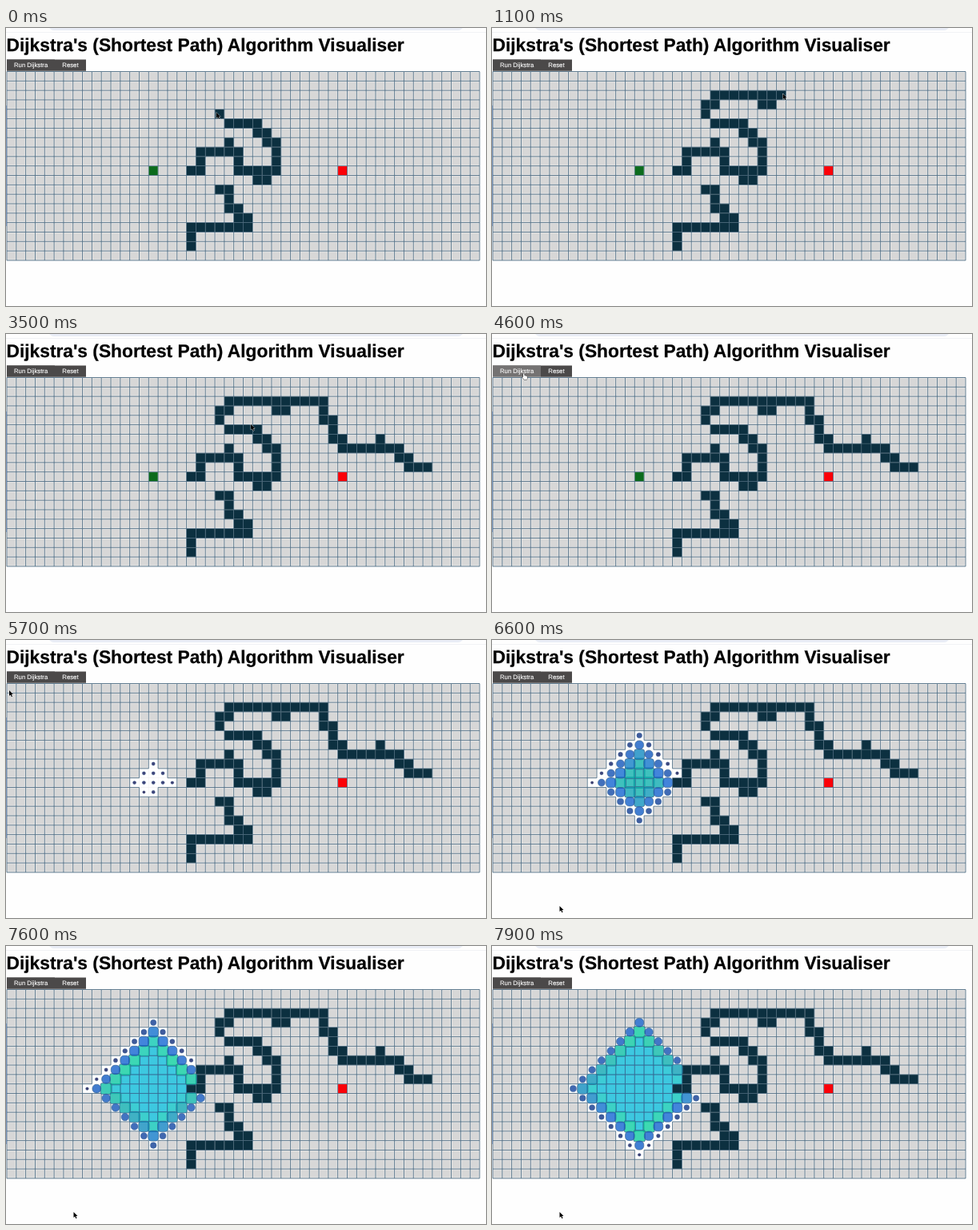
These frames come from a looping animation (600x348 px, 8 s). An HTML page with a canvas:

```html
<!DOCTYPE html>
<html lang="en">
<head>
<meta charset="utf-8">
<title>Shortest path visualiser</title>
<style>
  html, body { margin: 0; width: 600px; height: 348px; overflow: hidden; background: #fefefe; }
  svg, canvas { position: absolute; left: 0; top: 0; }
  text { font: 7.75px "Liberation Sans", Arial, sans-serif; fill: #fff; stroke: #fff; stroke-width: 0.12; text-rendering: geometricPrecision; }
  .title { font-size: 22.75px; font-weight: bold; fill: #000; stroke: #000; stroke-width: 0.25; }
</style>
</head>
<body>
<svg width="600" height="348">
  <rect x="53" y="-12" width="519" height="15" rx="7" fill="#e9edf6"/>
  <path d="M0 5.5H600" stroke="#f1f2f5"/>
  <path d="M0.5 97V248" stroke="#6088d2"/>
  <text class="title" x="0.5" y="29.2">Dijkstra's (Shortest Path) Algorithm Visualiser</text>
  <rect x="1" y="39.5" width="99" height="14.5" fill="#4b4949"/>
  <rect id="run" x="1" y="39.5" width="60" height="14.5" fill="#4b4949"/>
  <text x="10" y="49">Run Dijkstra</text>
  <text x="70.3" y="49">Reset</text>
</svg>
<canvas id="stage" width="600" height="348"></canvas>
<script>
const ctx = document.getElementById('stage').getContext('2d');
const runButton = document.getElementById('run');
const LOOP = 8000, TICK = 100;
const COLS = 50, ROWS = 20, CELL = 11.82, LEFT = 1, TOP = 54.5;
const START = [15, 10], END = [35, 10];
const WALL = '#0c3040';
const MS_PER_WALL = 88;
const SEARCH_BEGIN = 5470, FIRST_PAINT = 5650, MS_PER_VISIT = 23, VISIT_LENGTH = 1500;

const key = (col, row) => row * COLS + col;
const corner = (col, row) => [LEFT + col * CELL, TOP + row * CELL];
const mix = (a, b, f) => a + (b - a) * f;
const clamp01 = x => Math.min(1, Math.max(0, x));
const easeOut = x => 1 - (1 - x) ** 1.667;

// Walks from a cell along steps such as 'r3 d' and returns every cell passed.
const STEPS = { u: [0, -1], d: [0, 1], l: [-1, 0], r: [1, 0] };
function walk(col, row, steps = '') {
  const cells = [[col, row]];
  for (const [, direction, count] of steps.matchAll(/([udlr])(\d*)/g)) {
    const [dx, dy] = STEPS[direction];
    for (let n = Number(count || 1); n > 0; n--) cells.push([col += dx, row += dy]);
  }
  return cells;
}

const oldWalls = [
  ...walk(23, 5, 'r3 d r d r d3 l4 u2 l4 d2 l'),
  ...walk(23, 7),
  ...walk(26, 11, 'r'),
  ...walk(22, 12, 'r d2 r d r d l6 d2')
];
const newWalls = walk(22, 4, 'u r u r5 d r u r4 d2 r d2 r d r4 u d r2 d r d r2');

// Cells in the order of the search: by distance, then row by row.
function searchOrder() {
  const walls = new Set([...oldWalls, ...newWalls].map(cell => key(...cell)));
  const distance = new Map([[key(...START), 0]]);
  const queue = [START];
  for (const [col, row] of queue) {
    const next = distance.get(key(col, row)) + 1;
    for (const [dx, dy] of Object.values(STEPS)) {
      const c = col + dx, r = row + dy, k = key(c, r);
      if (c < 0 || r < 0 || c >= COLS || r >= ROWS || walls.has(k) || distance.has(k)) continue;
      distance.set(k, next);
      queue.push([c, r]);
    }
  }
  return queue.sort((a, b) =>
    distance.get(key(...a)) - distance.get(key(...b)) || key(...a) - key(...b));
}

const visits = searchOrder().map((cell, i) =>
  ({ cell, time: Math.max(FIRST_PAINT, SEARCH_BEGIN + i * MS_PER_VISIT) }));

const tints = [
  { at: 0, rgb: [0, 0, 66] },
  { at: 0.5, rgb: [8, 94, 208] },
  { at: 0.75, rgb: [0, 205, 152] },
  { at: 1, rgb: [0, 183, 215] }
];
function tint(p) {
  const i = Math.max(1, tints.findIndex(stop => stop.at >= p));
  const a = tints[i - 1], b = tints[i];
  const f = easeOut((p - a.at) / (b.at - a.at));
  return `rgba(${a.rgb.map((v, k) => Math.round(mix(v, b.rgb[k], f)))},0.76)`;
}

function fillCell(cell, color, inset = 0) {
  const [x, y] = corner(...cell);
  ctx.fillStyle = color;
  ctx.fillRect(x + inset, y + inset, CELL - 2 * inset, CELL - 2 * inset);
}

function strokePath(path, color, width) {
  ctx.strokeStyle = color;
  ctx.lineWidth = width;
  ctx.stroke(path);
}

// Visited cells lose their outline; their neighbours keep it.
function drawGrid(visitedKeys) {
  const lines = new Path2D();
  const open = (col, row) =>
    col >= 0 && row >= 0 && col < COLS && row < ROWS && !visitedKeys.has(key(col, row));
  for (let row = 0; row <= ROWS; row++) {
    for (let col = 0; col <= COLS; col++) {
      const [x, y] = corner(col, row);
      if (open(col, row) || open(col - 1, row)) { lines.moveTo(x, y); lines.lineTo(x, y + CELL); }
      if (open(col, row) || open(col, row - 1)) { lines.moveTo(x, y); lines.lineTo(x + CELL, y); }
    }
  }
  strokePath(lines, 'rgba(255,255,255,0.35)', 2.6);
  strokePath(lines, '#47677f', 0.85);
}

function drawVisit({ cell, time }, t) {
  const p = clamp01((t - time) / VISIT_LENGTH);
  const scale = p < 0.75 ? mix(0.3, 1.2, easeOut(p / 0.75)) : mix(1.2, 1, easeOut((p - 0.75) * 4));
  const size = CELL * scale, shift = (CELL - size) / 2;
  const [x, y] = corner(...cell);
  const shape = new Path2D();
  shape.roundRect(x + shift, y + shift, size, size, size * Math.min(0.5, 1 - easeOut(p)));
  ctx.fillStyle = tint(p);
  ctx.fill(shape);
  strokePath(shape, '#3a6590', 0.7 * scale);
}

const arrow = new Path2D('M0 0V7L1.7 5.5L2.9 8.2L4 7.7L2.9 5.1H5Z');
const hand = new Path2D('M0 0.8Q0.8 -0.4 1.5 0.8V3L4.8 3.8Q5.4 4 5.2 5L4.6 8H1L-1.3 4.8Q-1 4 0 5Z');

function drawPointer(x, y, overButton) {
  const shape = overButton ? hand : arrow;
  ctx.save();
  ctx.translate(x, y);
  strokePath(shape, overButton ? '#111' : '#fff', 0.8);
  ctx.fillStyle = overButton ? '#fff' : '#000';
  ctx.fill(shape);
  ctx.restore();
}

// The pointer draws the wall, then glides to the button, the corner and the bottom.
const glides = [
  { from: 3200, to: 4200, x: 39, y: 49 },
  { from: 5400, to: 5700, x: 4, y: 63 },
  { from: 5900, to: 6150, x: 84.5, y: 333 }
];
function pointerAt(t, progress) {
  const i = Math.floor(progress);
  const a = corner(...newWalls[i]), b = corner(...newWalls[Math.min(i + 1, newWalls.length - 1)]);
  let x = mix(a[0], b[0], progress - i) + 2, y = mix(a[1], b[1], progress - i) + 4;
  for (const glide of glides) {
    const f = easeOut(clamp01((t - glide.from) / (glide.to - glide.from)));
    x = mix(x, glide.x, f);
    y = mix(y, glide.y, f);
  }
  return [x, y];
}

function draw(t) {
  ctx.clearRect(0, 0, 600, 348);
  ctx.fillStyle = '#d7d7d7';
  ctx.fillRect(LEFT, TOP, COLS * CELL, ROWS * CELL);

  const visited = visits.filter(visit => visit.time <= t);
  visited.forEach(visit => fillCell(visit.cell, '#fff'));
  drawGrid(new Set(visited.map(visit => key(...visit.cell))));

  const progress = Math.min(newWalls.length - 1, t / MS_PER_WALL);
  const walls = [...oldWalls, ...newWalls.slice(0, Math.floor(progress) + 1)];
  walls.forEach(cell => fillCell(cell, WALL, 0.3));
  if (!visited.length) fillCell(START, '#0b6b1c', 0.4);
  fillCell(END, '#fb0007', 0.4);
  visited.forEach(visit => drawVisit(visit, t));

  const [x, y] = pointerAt(t, progress);
  const overButton = x < 61 && y > 39 && y < 54;
  runButton.setAttribute('fill', overButton ? '#747272' : '#4b4949');
  drawPointer(x, y, overButton);
}

const begin = performance.now();
function frame() {
  const t = (performance.now() - begin) % LOOP;
  draw(Math.floor(t / TICK) * TICK);
  requestAnimationFrame(frame);
}
frame();
</script>
</body>
</html>
```
